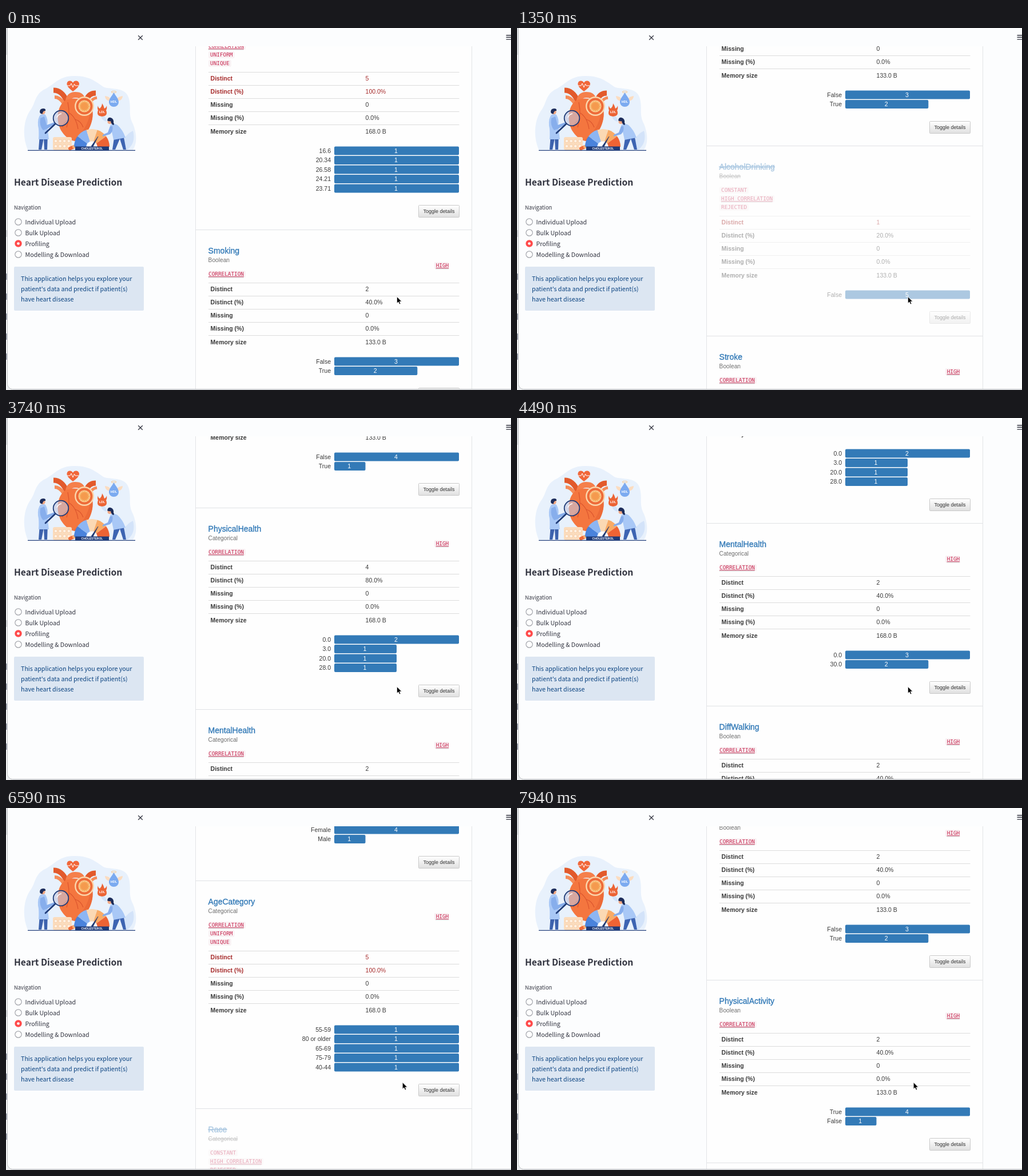
An HTML page for the animation above (8000 ms loop, 883x634 px).

```html
<!DOCTYPE html>
<html lang="en">
<head>
<meta charset="utf-8">
<title>Heart Disease Prediction</title>
<style>
html, body { margin: 0; width: 100%; height: 100%; overflow: hidden; background: #eceef0; }
svg { display: block; }
text { font-family: "Liberation Sans", Arial, sans-serif; font-size: 10.5px; fill: #3a3a3a; white-space: pre; }
.side text { font-family: "Noto Sans CJK JP", "Noto Sans CJK SC", "Noto Sans", sans-serif; font-size: 10.68px; fill: #31333f; }
.side .head { font-size: 15.65px; font-weight: 700; }
.side .nav { font-size: 9.4px; }
.side .info { fill: #0b4380; }
.art text { font-family: "Liberation Sans", Arial, sans-serif; font-weight: 700; fill: #fff; text-anchor: middle; }
.title { font-size: 14px; fill: #337ab7; stroke: #337ab7; stroke-width: .35; }
.type { font-size: 10.2px; fill: #6f6f6f; }
.off { opacity: .4; }
.off .title, .off .type { text-decoration: line-through; }
.key { font-weight: 700; }
.alert { fill: #a62b2b; }
.label { text-anchor: end; }
.count { fill: #fff; text-anchor: middle; }
.btn { font-size: 9px; fill: #333; text-anchor: middle; }
.tag { font-family: "DejaVu Sans Mono", "Liberation Mono", monospace; font-size: 9.35px; fill: #c7254e; }
</style>
</head>
<body>
<svg id="stage" width="883" height="634" viewBox="0 0 883 634">
  <defs>
    <linearGradient id="face" x2="0" y2="1"><stop stop-color="#fff"/><stop offset="1" stop-color="#e0e0e0"/></linearGradient>
    <clipPath id="view"><rect x="331" y="32" width="485" height="600"/></clipPath>
  </defs>

  <!-- window -->
  <rect y="47" width="2" height="587" fill="#f3f4f5"/>
  <rect width="2" height="47" fill="#d9dbde"/>
  <rect y="633" x="8" width="875" height="1" fill="#dcdee0"/>
  <rect x="2.5" y="-20" width="900" height="652.5" rx="9" fill="#fcfdfe" stroke="#c3c5c8"/>
  <g id="marks"></g>

  <g class="side">
    <path d="M231.200 13.200l7.600 7.600m0-7.600l-7.600 7.600" stroke="#31333f" stroke-width="1.300"/>
    <path d="M874.500 12.700H884M874.500 16.300H884M874.500 19.900H884" stroke="#31333f" stroke-width="1.400"/>
    <text class="head" x="14" y="276">Heart Disease Prediction</text>
    <text class="nav" x="14" y="317.500">Navigation</text>
    <g id="options"></g>
    <rect x="14" y="418" width="227" height="77" rx="2" fill="#dce6f2"/>
    <text class="info" x="26" y="443">This application helps you explore your</text>
    <text class="info" x="26" y="461">patient's data and predict if patient(s)</text>
    <text class="info" x="26" y="479">have heart disease</text>
  </g>

  <g class="art">
    <path d="M38 213C28 190 30 160 44 142C52 130 50 118 66 108C84 100 92 84 118 84C146 83 158 95 172 104C190 108 210 104 215 124C219 140 214 150 220 164C229 182 230 202 222 213Z" fill="#e8f1fc"/>
    <path d="M206 213C202 196 210 186 222 180C226 194 222 206 212 213Z" fill="#d3e3f9"/>
    <path d="M176 164q-10-2-10-12q10 2 10 12" fill="#d3e3f9"/>
    <!-- small heart -->
    <path d="M117 111C109 105 106 101 106.500 97C107.500 91.500 114.500 91 117 96C119.500 91 126.500 91.500 128 97C128 102 125 105 117 111Z" fill="#f1673a"/>
    <path d="M107 101h5l2-4 3 7 2.500-6 1.500 3h6" fill="none" stroke="#fff"/>
    <!-- large heart -->
    <g fill="none" stroke-linecap="butt">
      <path d="M83 109Q98 109 106 128" stroke="#e25a2c" stroke-width="9"/>
      <path d="M85 121Q94 121 101 132" stroke="#f58b58" stroke-width="6"/>
      <path d="M109 132Q108 117 121 117T132 126" stroke="#f5804b" stroke-width="10"/>
      <path d="M141 125Q145 114 157 114" stroke="#e25a2c" stroke-width="9"/>
      <path d="M146 132Q151 123 159 122" stroke="#f58b58" stroke-width="5"/>
    </g>
    <path d="M102 128C112 121 140 121 149 136C157 155 147 182 128 197C118 201 106 194 98 182C87 166 88 139 102 128Z" fill="#f4763f"/>
    <path d="M127 197C143 186 157 162 149 136C146 166 136 182 118 197Z" fill="#ec6a38"/>
    <path d="M108 130Q113 153 106 174M111 149q12 8 15 28M110 160q-10 5-11 14M121 160q10 3 14 14" fill="none" stroke="#dd562e" stroke-width="1.200"/>
    <!-- plaque -->
    <circle cx="137" cy="137" r="17" fill="#fbd5ab"/>
    <circle cx="137" cy="137" r="14.500" fill="#ee6b39"/>
    <circle cx="137" cy="137" r="10.500" fill="#fbc98f"/>
    <circle cx="137" cy="137" r="7.500" fill="#f59a4e" stroke="#f4b05f" stroke-width="3" stroke-dasharray="2 1.500"/>
    <!-- LDL and HDL -->
    <path d="M161 136q0 4 3 5q4-4 4-9q3 4 4 9q3-1 4-5q1 5-1 8q4 10-7 11q-11-1-7-11q-2-4 0-8Z" fill="#ec6435"/>
    <text x="168" y="149" style="font-size:5.500px">LDL</text>
    <path d="M181 128q-8-2-8-9q7 1 9 4zM196 128q8-2 8-9q-7 1-9 4z" fill="#fbdcc0"/>
    <ellipse cx="188.500" cy="112" rx="4.500" ry="1.500" fill="none" stroke="#f8c98f"/>
    <path d="M188.500 113C193 121 197 124 197 130a8.500 8 0 0 1-17 0C180 124 184 121 188.500 113Z" fill="#7baaf0"/>
    <text x="188.500" y="131" style="font-size:5.500px">HDL</text>
    <!-- blister and capsule -->
    <rect x="82" y="191" width="33" height="23" rx="3" fill="#fbdcbd"/>
    <g id="pills" fill="#fff1e2" stroke="#f4c49c" stroke-width=".7"></g>
    <path d="M112 211l7-3" stroke="#f06a38" stroke-width="6" stroke-linecap="round"/>
    <path d="M119 208l5-2" stroke="#f9b173" stroke-width="6" stroke-linecap="round"/>
    <!-- gauge -->
    <g id="gauge"></g>
    <path d="M141 208a9 9 0 0 1 18 0Z" fill="#fff"/>
    <path d="M149 207l12-17-9 18Z" fill="#1d3670" stroke="#1d3670" stroke-width=".6"/>
    <rect x="121" y="207.500" width="59" height="7" fill="#1e3a78"/>
    <text x="150.500" y="213" style="font-size:5px">CHOLESTEROL</text>
    <!-- left doctor -->
    <path d="M59 186l-2 27h5l4-20 1 20h5l1-27Z" fill="#3c62ad"/>
    <path d="M60 152q5-3 9 0q5 8 3 18l3 25h-18q1-16-1-24q-1-13 4-19Z" fill="#a9c8f6"/>
    <path d="M60 158q-2 14 5 21l8-3 13-8-1-3-14 5-4-15Z" fill="#87aeec"/>
    <circle cx="64.500" cy="147" r="4.200" fill="#f3a983"/>
    <path d="M59 147q0-6 6-6q5 0 4 4q-5 0-5 5q-4 1-5-3Z" fill="#1d2d5b"/>
    <path d="M69 184l17-16" stroke="#203c78" stroke-width="2.800" stroke-linecap="round"/>
    <circle cx="96" cy="158" r="13.300" fill="#c3c8df" fill-opacity=".6" stroke="#203c78" stroke-width="1.800"/>
    <path d="M89 157q2-6 8-7" fill="none" stroke="#fff" stroke-width="1.400"/>
    <!-- right doctor -->
    <path d="M190 186l-4 27h5l8-19 6 19h5l-5-27Z" fill="#3d64b2"/>
    <path d="M182 170q6-4 13 0q9 8 14 22l-21 4q-2-11-6-26Z" fill="#a9c8f6"/>
    <path d="M186 172q2 8-4 14l-13 4v-3l9-4 4-11Z" fill="#86adec"/>
    <circle cx="181.500" cy="164" r="4" fill="#f3a983"/>
    <path d="M177 162q1-6 6-5q6 2 5 9q2 2 0 4q-4-1-5-7q-3 1-6-1Z" fill="#1d2d5b"/>
    <path d="M38 214.300H226" stroke="#23407d" stroke-width="1.200"/>
  </g>

  <!-- report -->
  <g clip-path="url(#view)">
    <rect x="331.500" y="0" width="483" height="640" fill="#fefefe" stroke="#e2e4e7"/>
    <g id="report"></g>
  </g>

  <path id="cursor" d="M0 0V11.800L2.700 9.300 4.600 13.500 6.600 12.600 4.800 8.600H8.500Z" stroke="#fff" stroke-width=".8"/>
</svg>
<script>
const LOOP = 8000;
const $ = id => document.getElementById(id);

function add(parent, name, attrs, text) {
  const el = document.createElementNS("http://www.w3.org/2000/svg", name);
  for (const k in attrs) el.setAttribute(k, attrs[k]);
  if (text !== undefined) el.textContent = text;
  parent.appendChild(el);
  return el;
}
const write = (g, cls, x, y, s) => add(g, "text", { class: cls, x, y }, s);
const box = (g, x, y, width, height, fill, more) =>
  add(g, "rect", { x, y, width, height, fill, ...more });

// Sidebar parts
["Individual Upload", "Bulk Upload", "Profiling", "Modelling & Download"].forEach((name, i) => {
  const g = $("options"), cy = 339.5 + 19 * i, on = i === 2;
  add(g, "circle", { cx: 21.5, cy, r: on ? 6.2 : 5.7, fill: on ? "#ff4b4b" : "#fff",
    stroke: on ? "none" : "#a3a5ab", "stroke-width": 1.2 });
  if (on) add(g, "circle", { cx: 21.5, cy, r: 2.3, fill: "#fff" });
  write(g, "", 33.6, cy + 4, name);
});
for (let i = 0; i < 5; i++) box($("marks"), 0, 430 + 35 * i, 1.5, 11, "#858a99");
box($("marks"), 0, 354, 2, 12, "#d5d7da");
for (let i = 0; i < 8; i++)
  add($("pills"), "circle", { cx: 87 + 7.6 * (i % 4), cy: 198 + 9 * (i >> 2), r: 2.8 });

["#4a83dc", "#8db6f3", "#fbd9b4", "#f9ab66", "#ee6334"].forEach((fill, i) => {
  const at = (k, r) => {
    const a = Math.PI * (1 + k / 5);
    return `${150 + r * Math.cos(a)} ${208 + r * Math.sin(a)}`;
  };
  add($("gauge"), "path", { fill,
    d: `M${at(i, 31)}A31 31 0 0 1 ${at(i + 1, 31)}L${at(i + 1, 10)}L${at(i, 10)}Z` });
});

// Report: name, type, tag set, distinct count, bars
const BOOL = "Boolean", CAT = "Categorical";
const fields = [
  ["BMI", CAT, "unique", 5, "16.6:1 20.34:1 26.58:1 24.21:1 23.71:1"],
  ["Smoking", BOOL, "high", 2, "False:3 True:2"],
  ["AlcoholDrinking", BOOL, "constant", 1, "False:5"],
  ["Stroke", BOOL, "high", 2, "False:4 True:1"],
  ["PhysicalHealth", CAT, "high", 4, "0.0:2 3.0:1 20.0:1 28.0:1"],
  ["MentalHealth", CAT, "high", 2, "0.0:3 30.0:2"],
  ["DiffWalking", BOOL, "high", 2, "False:4 True:1"],
  ["Sex", CAT, "high", 2, "Female:4 Male:1"],
  ["AgeCategory", CAT, "unique", 5, "55-59:1 80_or_older:1 65-69:1 75-79:1 40-44:1"],
  ["Race", CAT, "constant", 1, "White:5"],
  ["Diabetic", BOOL, "high", 2, "False:3 True:2"],
  ["PhysicalActivity", BOOL, "high", 2, "True:4 False:1"]
];

function tag(g, x, y, s, linked, left = 3, right = 3) {
  const w = s.length * 5.63;
  box(g, x - left, y - 6, w + left + right, 12, "#f9f2f4", { rx: 2 });
  write(g, "tag", x, y + 3.4, s);
  if (linked) {
    box(g, x, y + 4.3, w, .8, "#c7254e");
    add(g, "path", { d: `M${x} ${y + 6}h${w}`, stroke: "#9a8a8e", "stroke-dasharray": "1 1" });
  }
}

function section(top, [name, type, set, distinct, data]) {
  const root = $("report"), constant = set === "constant";
  const g = add(root, "g", { transform: `translate(0 ${top})`, class: constant ? "off" : "" });
  const extra = set === "high" ? 0 : 30;
  write(g, "title", 353.6, 41.7, name);
  write(g, "type", 353.6, 56.7, type);

  if (constant) {
    tag(g, 357, 78, "CONSTANT");
    tag(g, 357, 93, "HIGH CORRELATION", true);
    tag(g, 357, 108, "REJECTED");
  } else {
    tag(g, 751.7, 62.9, "HIGH", true, 3, 0);
    tag(g, 354, 77.9, "CORRELATION", true, 0, 3);
    if (extra) {
      tag(g, 357, 93, "UNIFORM");
      tag(g, 357, 108, "UNIQUE");
    }
  }

  [["Distinct", distinct], ["Distinct (%)", (distinct * 20).toFixed(1) + "%"], ["Missing", 0],
   ["Missing (%)", "0.0%"], ["Memory size", type === BOOL ? "133.0 B" : "168.0 B"]
  ].forEach(([key, value], i) => {
    const y = 104.3 + extra + 23.1 * i;
    const red = set === "unique" && i < 2 || constant && i < 1 ? " alert" : "";
    box(g, 354, Math.round(y - 11.8), 438.5, 1, "#dcdcdc");
    write(g, "key" + red, 357.6, y + 3.8, key);
    write(g, red, 628.6, y + 3.8, value);
  });

  const bars = data.split(" ").map(s => s.split(":"));
  const max = bars[0][1];
  bars.forEach(([label, n], i) => {
    const y = 231 + extra + 16.5 * i, w = 218 * n / max;
    write(g, "label", 568, y + 3.8, label.replace(/_/g, " "));
    box(g, 574, y - 7.5, w, 15, "#337ab7", { rx: 2 });
    write(g, "count", 573 + w / 2, y + 3.8, n);
  });

  const mid = 231 + extra + 16.5 * (bars.length - 1) + 40.2;
  box(g, 721.5, Math.round(mid - 11) + .5, 71, 21, "url(#face)", { stroke: "#c9c9c9", rx: 1 });
  write(g, "btn", 757, mid + 3, "Toggle details");

  const end = top + Math.floor(mid + 32.4);
  box(root, 332, end, 482, 1, "#e0e2e5");
  return end;
}
fields.reduce(section, -46);

// Scroll position at moments of the loop
const scroll = [
  [0, 0], [1350, 467], [1640, 535], [1790, 535], [2240, 625], [2390, 625], [2540, 654],
  [3740, 1169], [4790, 1625], [4940, 1625], [5390, 1802], [5540, 1802], [6590, 2512], [7940, 3390]
];

function offset(t) {
  const i = scroll.findIndex(k => k[0] >= t);
  if (i < 0) return scroll[scroll.length - 1][1];
  if (i === 0) return scroll[0][1];
  const [t0, a] = scroll[i - 1], [t1, b] = scroll[i];
  return Math.round(a + (b - a) * (t - t0) / (t1 - t0));
}

// The picture advances in ticks of 150 ms, with one shorter tick before 1640
function tick(t) {
  const base = t < 1640 ? 0 : 1640;
  return base + Math.floor((t - base) / 150) * 150;
}

function draw() {
  const t = tick(performance.now() % LOOP);
  $("report").setAttribute("transform", `translate(0 ${-offset(t)})`);
  $("cursor").setAttribute("transform", t < 5090 ? "translate(683.400 470.500)" : "translate(693.200 480.500)");
  requestAnimationFrame(draw);
}
draw();
</script>
</body>
</html>
```
